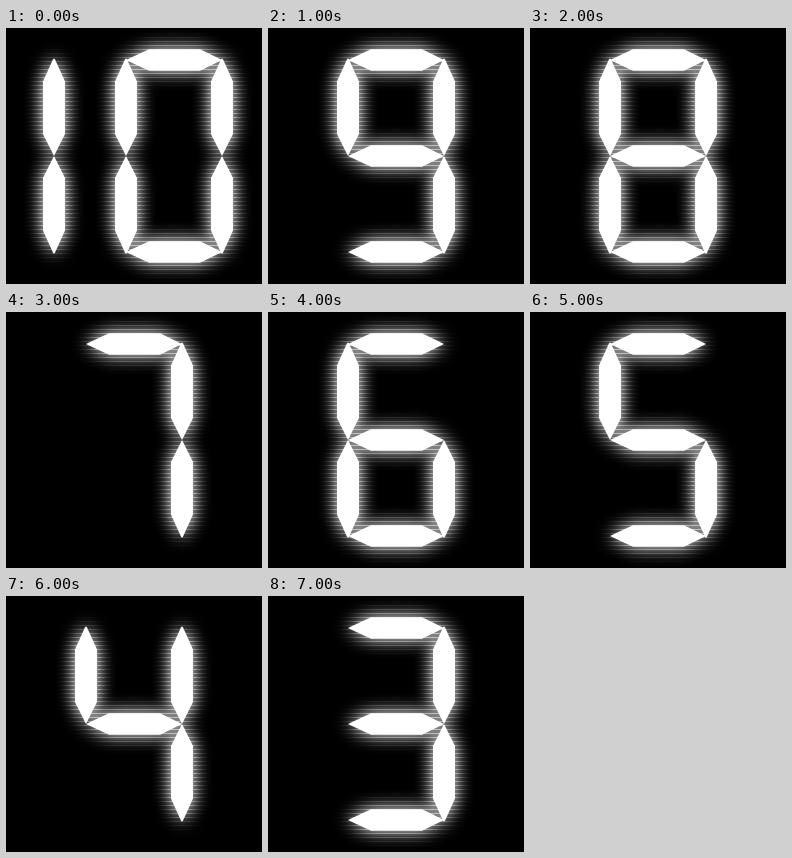
These frames come from a looping animation (256x256 px, 8 s). An HTML page:

```html
<!DOCTYPE html>
<html lang="en">
<head>
<meta charset="utf-8">
<title>Countdown</title>
<style>
html, body { margin: 0; width: 100%; height: 100%; overflow: hidden; background: #000; }
svg { display: block; width: 100vw; height: 100vh; }
</style>
</head>
<body>
<svg viewBox="0 0 256 256">
  <defs>
    <filter id="glow" filterUnits="userSpaceOnUse" x="-40" y="-40" width="336" height="336">
      <feGaussianBlur stdDeviation="8.5"/>
      <feComponentTransfer><feFuncA type="linear" slope="2"/></feComponentTransfer>
    </filter>
    <pattern id="lines" width="4" height="4" patternUnits="userSpaceOnUse">
      <rect y="1" width="4" height="1" fill="#fff"/>
    </pattern>
    <mask id="scan" maskUnits="userSpaceOnUse" x="0" y="0" width="256" height="256">
      <rect width="256" height="256" fill="url(#lines)"/>
    </mask>
    <path id="digits"/>
  </defs>
  <rect width="256" height="256" fill="#000"/>
  <g fill="#fff">
    <use href="#digits" filter="url(#glow)" opacity=".5"/>
    <g mask="url(#scan)"><use href="#digits" filter="url(#glow)" opacity=".5"/></g>
    <use href="#digits"/>
  </g>
</svg>
<script>
const STEP = 1000, FIRST = 10, COUNT = 8;
const SIZE = 96, TOP = 32;
const SEGMENTS = ['abcdef', 'bc', 'abged', 'abgcd', 'fgbc', 'afgcd', 'afgedc', 'abc', 'abcdefg', 'abcdfg'];
const digits = document.getElementById('digits');

const across = (x, y) =>
  `M${x} ${y}l23 -10.7h51l22 10.7l-22 10.7h-51z`;
const down = (x, y) =>
  `M${x} ${y - 1.5}q.8 0 1.3 1.5l9.7 21.5v52.5l-11 22l-11 -22v-52.5l9.7 -21.5q.5 -1.5 1.3 -1.5z`;
// Lower bars are the upper ones turned over
const downLow = (x, y) =>
  `M${x} ${y}l11 22v52.5l-9.7 21.5q-.5 1.5 -1.3 1.5q-.8 0 -1.3 -1.5l-9.7 -21.5v-52.5z`;

function digit(n, x) {
  const mid = TOP + SIZE, right = x + SIZE;
  const shapes = {
    a: () => across(x, TOP),
    b: () => down(right, TOP),
    c: () => downLow(right, mid),
    d: () => across(x, mid + SIZE),
    e: () => downLow(x, mid),
    f: () => down(x, TOP),
    g: () => across(x, mid)
  };
  return [...SEGMENTS[n]].map(s => shapes[s]()).join('');
}

let shown;
function draw(ms) {
  const n = FIRST - Math.floor(ms / STEP) % COUNT;
  if (n !== shown) {
    shown = n;
    digits.setAttribute('d', n > 9 ? digit(1, 48 - SIZE) + digit(0, 120) : digit(n, 80));
  }
}

const start = performance.now();
function tick() {
  draw(performance.now() - start);
  requestAnimationFrame(tick);
}
tick();
</script>
</body>
</html>
```
